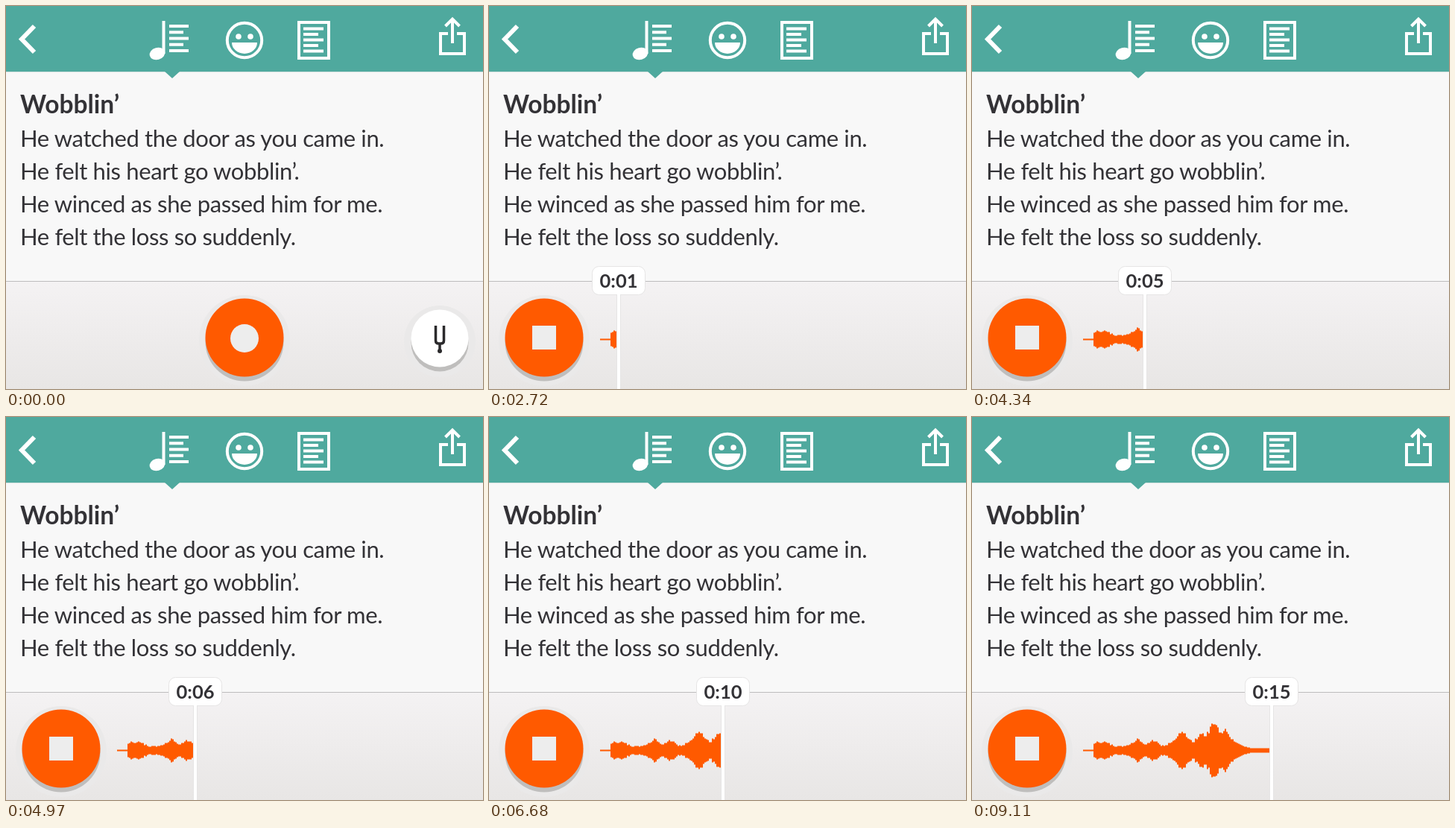
These frames come from a looping animation (640 px wide and 514 px high, 9200 ms). An HTML page:

```html
<!DOCTYPE html>
<html lang="en">
<head>
<meta charset="utf-8">
<title>Lyric recorder</title>
<style>
  html, body { margin: 0; width: 100%; height: 100%; overflow: hidden; background: #f8f8f8; }
  svg { display: block; width: 100vw; height: 100vh; }
  text { font-family: Lato, "Open Sans", sans-serif; fill: #333236; }
  .lyrics { font-size: 31px; letter-spacing: -.37px; }
  .title { font-size: 33.5px; font-weight: 700; letter-spacing: 0; }
  .icon { fill: none; stroke: #fff; stroke-width: 4; }
  .solid { fill: #fff; stroke: none; }
  .halo { fill: #eae9e9; }
  .shade { fill: #bfbebd; }
</style>
</head>
<body>
<svg viewBox="0 0 640 514">
  <defs>
    <linearGradient id="panel" x2="0" y2="1">
      <stop stop-color="#f4f2f3"/>
      <stop offset="1" stop-color="#e8e6e5"/>
    </linearGradient>
    <clipPath id="recorded"><rect id="reveal" x="149" y="370" width="0" height="144"/></clipPath>
  </defs>
  <rect width="640" height="514" fill="#f8f8f8"/>
  <path d="M0 88.500H640" stroke="#d3e0de"/>
  <path d="M0 0H640V88H233L223 97L213 88H0Z" fill="#4fa99e"/>

  <g class="icon">
    <path d="M38 27L21 44.500L38 62" stroke-width="6"/>
    <path d="M211.500 20V64"/>
    <path id="noteLines"/>
    <ellipse class="solid" cx="203" cy="64" rx="10.500" ry="8" transform="rotate(-15 203 64)"/>
    <circle cx="320" cy="46" r="23.200"/>
    <g class="solid">
      <circle cx="312" cy="41" r="3.800"/>
      <circle cx="328" cy="41" r="3.800"/>
      <path d="M303 49H337A17 15 0 0 1 303 49Z"/>
    </g>
    <path d="M393 22H433V70H393Z"/>
    <path id="pageLines"/>
    <path d="M593 37H583V64H615V37H605M599 50V18M589.500 27L599 17.500L608.500 27"/>
  </g>

  <g class="lyrics">
    <text class="title" x="19" y="144">Wobblin’</text>
    <text x="19" y="189">He watched the door as you came in.</text>
    <text x="19" y="233">He felt his heart go wobblin’.</text>
    <text x="19" y="277">He winced as she passed him for me.</text>
    <text x="19" y="321">He felt the loss so suddenly.</text>
  </g>

  <rect y="370" width="640" height="144" fill="url(#panel)"/>
  <path d="M0 369.500H640" stroke="#bdbcbd"/>

  <g id="tuner">
    <circle class="halo" cx="582" cy="450" r="48"/>
    <circle class="shade" cx="582" cy="452" r="38.500"/>
    <circle cx="582" cy="446" r="38.500" fill="#fff"/>
    <path d="M576.500 429V449Q576.500 453 580.500 453H583.500Q587.500 453 587.500 449V429M582 453V462" fill="none" stroke="#2b2a2c" stroke-width="3.500"/>
    <circle cx="582" cy="463" r="3" fill="#2b2a2c"/>
  </g>

  <path id="wave" fill="#ff5a00" clip-path="url(#recorded)"/>

  <g id="button">
    <g id="raised">
      <circle class="halo" cy="449" r="61"/>
      <circle class="shade" cy="451" r="52.500"/>
    </g>
    <circle id="disc" cy="445" fill="#ff5a00"/>
    <rect id="mark" fill="#ededed"/>
  </g>

  <g id="cursor">
    <path d="M0 387V514" stroke="#e6e5e5" stroke-width="6"/>
    <rect x="-35.500" y="349.500" width="71" height="38" rx="9" fill="#fff" stroke="#e6e5e5"/>
    <path d="M0 385V514" stroke="#fff" stroke-width="4"/>
    <text id="clock" y="378" font-size="25.500" font-weight="700" text-anchor="middle"></text>
  </g>
</svg>
<script>
const LOOP = 9200, START = 2000, STEP = 90;
const el = id => document.getElementById(id);
const set = (id, attrs) => {
  for (const key in attrs) el(id).setAttribute(key, attrs[key]);
};
const clamp = v => Math.max(0, Math.min(1, v));
const mix = (a, b, k) => a + (b - a) * k;

// Five text rows, every second one shorter
function rows(x, y, gap, width) {
  let d = "";
  for (let i = 0; i < 5; i++) d += `M${x} ${y + gap * i}h${i % 2 ? width - 7 : width}`;
  return d;
}
set("noteLines", { d: rows(219, 27, 8.25, 26) });
set("pageLines", { d: rows(399, 30.5, 7.5, 27) });

// Accents in the sound as [x, half height]; each fades out to both sides
const accents = [[167, 12], [178, 13], [221, 16], [242, 15], [281, 28], [307, 24], [324, 40], [339, 27]];

function loudness(x) {
  if (x < 163) return 1;
  const floor = x < 340 ? 6 : 3;
  const swell = Math.max(...accents.map(([at, h]) => h * Math.exp(-Math.abs(x - at) / 16)));
  const noise = Math.sin(x * 12.9898) * 43758.5453;
  const jitter = x < 356 ? mix(0.85, 1.1, noise - Math.floor(noise)) : 1;
  return Math.round(Math.max(floor, swell) * jitter);
}

let bars = "";
for (let x = 149; x < 399; x += 2) {
  const h = loudness(x);
  bars += `M${x} ${447.5 - h}h2v${2 * h}h-2z`;
}
set("wave", { d: bars });

function draw(time) {
  const n = Math.floor((time % LOOP - START) / STEP);
  const k = clamp((n - 1) / 5);
  const slide = k * k * (3 - 2 * k);
  const pressed = n === 0 || n === 1;
  const visibility = n >= 5 ? "visible" : "hidden";

  set("button", { transform: `translate(${mix(320, 74, slide)})` });
  set("raised", { visibility: pressed ? "hidden" : "visible" });
  set("disc", { r: pressed ? 54 : 52.5 });
  const size = mix(38, 32, slide);
  set("mark", {
    x: -size / 2, y: mix(446, 445, slide) - size / 2,
    width: size, height: size, rx: mix(19, 0, slide)
  });
  set("tuner", { transform: `translate(${110 * slide})` });

  // The playhead snaps to two-pixel columns
  const x = 2 * Math.floor((149.4 + 3.2 * n) / 2);
  set("cursor", { transform: `translate(${x})`, visibility });
  set("wave", { visibility });
  set("reveal", { width: Math.max(0, x - 152) });
  el("clock").textContent = "0:" + String(Math.max(0, Math.floor(n / 5))).padStart(2, "0");
}

const begin = performance.now();
function tick() {
  draw(performance.now() - begin);
  requestAnimationFrame(tick);
}
tick();
</script>
</body>
</html>
```
